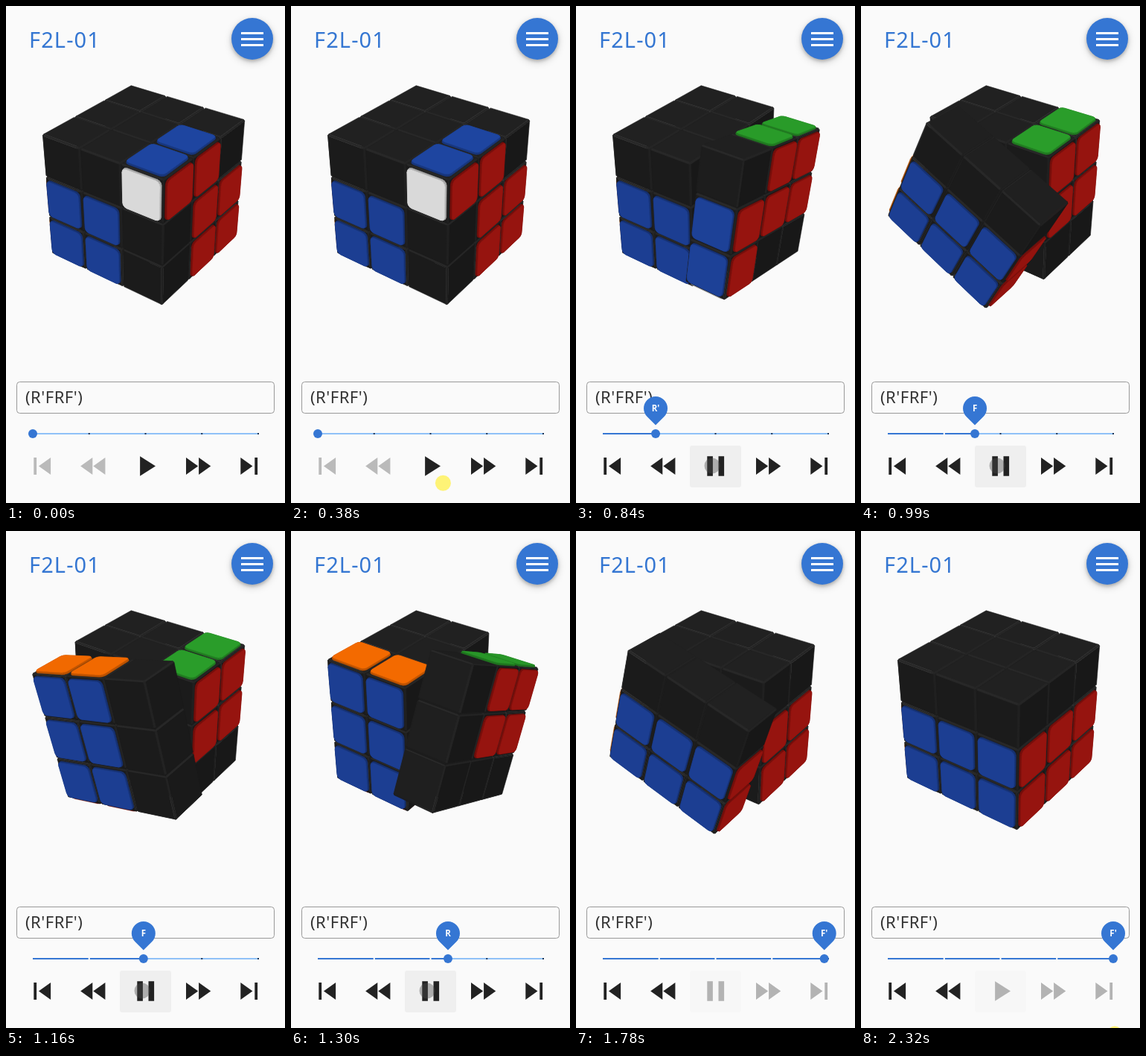
These frames come from a looping animation (375 px wide and 667 px high, 2400 ms). An HTML page with a canvas:

```html
<!DOCTYPE html>
<html lang="en">
<head>
<meta charset="utf-8">
<title>F2L-01</title>
<style>
html, body { margin: 0; width: 100%; height: 100%; overflow: hidden; background: #fafafa; }
canvas, svg { position: absolute; left: 0; top: 0; display: block; }
text { font-family: "Noto Sans", "Open Sans", sans-serif; }
#fab { filter: drop-shadow(0 2px 2px rgba(0,0,0,.2)) drop-shadow(0 3px 5px rgba(0,0,0,.2)); }
</style>
</head>
<body>
<canvas id="cube" width="375" height="667"></canvas>
<svg width="375" height="667" viewBox="0 0 375 667">
  <text x="31" y="56" font-size="29" letter-spacing="1.1" fill="#3476d2">F2L-01</text>
  <circle id="fab" cx="331" cy="44" r="28" fill="#3576d3"/>
  <path d="M316 35h30v3h-30zm0 8h30v3h-30zm0 8h30v3h-30z" fill="#fff"/>

  <rect x="14.5" y="504.5" width="346" height="42" rx="4" fill="none" stroke="#999"/>
  <text x="26" y="533" font-size="22" letter-spacing=".5" fill="#333">(R'FRF')</text>

  <rect x="36" y="573" width="304" height="2" fill="#8fc1f7"/>
  <rect id="track" x="36" y="573" height="2" fill="#3576d3"/>
  <g id="ticks"></g>
  <g id="thumb">
    <circle r="6" fill="#3576d3"/>
    <g id="pin">
      <path d="M-11.3-22.7A16 16 0 1 1 11.3-22.7L0-11.4z" fill="#3576d3"/>
      <text id="label" y="-30" font-size="11.5" font-weight="600" fill="#fff" text-anchor="middle"></text>
    </g>
  </g>

  <rect id="hover" x="153" y="590" width="69" height="56" rx="3"/>
  <circle id="ripple" cx="185" cy="617" r="28"/>
  <g id="buttons"></g>
  <circle id="cursor" r="10.5"/>
</svg>
<script>
const $ = id => document.getElementById(id);
const set = (el, attrs) => { for (const k in attrs) el.setAttribute(k, attrs[k]); };
const add = (parent, tag, attrs) => {
  const el = document.createElementNS("http://www.w3.org/2000/svg", tag);
  set(el, attrs);
  return parent.appendChild(el);
};
const clamp = v => Math.max(0, Math.min(1, v));

// ---- timing ----
const LOOP = 2400;
const STEPS = [0, 150, 230, 300, 380, 460, 530, 610, 680, 760, 840, 920, 990, 1070, 1160,
  1220, 1300, 1390, 1460, 1540, 1630, 1710, 1780, 1860, 1940, 2320];
const KEYS = [680, 990, 1300, 1540, 1780, 1860];
const TURNED = [.43, 1.29, 2.28, 2.978, 3.83, 4];
const SLID = [.29, 1.545, 2.31, 3, 3.93, 4];

function track(values, t) {
  if (t < KEYS[0]) return 0;
  const i = KEYS.findIndex(k => k > t);
  if (i < 0) return values[values.length - 1];
  const f = (t - KEYS[i - 1]) / (KEYS[i] - KEYS[i - 1]);
  return values[i - 1] + f * (values[i] - values[i - 1]);
}

// ---- vectors and camera ----
const dot = (a, b) => a[0] * b[0] + a[1] * b[1] + a[2] * b[2];
const cross = (a, b) => [a[1] * b[2] - a[2] * b[1], a[2] * b[0] - a[0] * b[2], a[0] * b[1] - a[1] * b[0]];
const unit = a => a.map(x => x / Math.hypot(...a));
const [sa, ca, se, ce] = [35.9, 32].flatMap(d => [Math.sin(d * Math.PI / 180), Math.cos(d * Math.PI / 180)]);
const RIGHT = [ca, 0, -sa], UP = [-se * sa, ce, -se * ca], TOWARD = [ce * sa, se, ce * ca];
const DIST = 10.5, FOCAL = 981, CX = 187.5, CY = 244.9;
const EYE = TOWARD.map(x => x * DIST);
const LIGHT = [.1, .9, .4];

function project(p) {
  const s = FOCAL / (DIST - dot(p, TOWARD));
  return [CX + s * dot(p, RIGHT), CY - s * dot(p, UP)];
}
const shade = n => .8 + .17 * Math.max(0, dot(n, LIGHT));
const faces = (p, n) => dot(n, EYE.map((e, i) => e - p[i])) > 0;

function rotate(v, axis, angle) {
  const i = (axis + 1) % 3, j = (axis + 2) % 3, c = Math.cos(angle), s = Math.sin(angle);
  const out = [...v];
  out[i] = v[i] * c - v[j] * s;
  out[j] = v[i] * s + v[j] * c;
  return out;
}

// ---- cubie geometry: a chamfered box with rounded plates ----
const HALF = .329, INNER = .309, PLATE = .296, ROUND = .065, RAISE = .026;
const grid = [];
for (const x of [-1, 0, 1]) for (const y of [-1, 0, 1]) for (const z of [-1, 0, 1])
  if (x || y || z) grid.push([x, y, z]);
const verts = grid.filter(g => g.every(Boolean))
  .flatMap(g => [0, 1, 2].map(a => g.map((s, i) => s * (i === a ? HALF : INNER))));
const sides = grid.map(n => {
  const top = Math.max(...verts.map(v => dot(v, n)));
  const t = unit(cross(n, [.3, .7, .2])), b = cross(unit(n), t);
  const turn = v => Math.atan2(dot(v, b), dot(v, t));
  return {
    n: unit(n),
    edge: Math.abs(n[0]) + Math.abs(n[1]) + Math.abs(n[2]) > 1,
    pts: verts.filter(v => dot(v, n) > top - 1e-6).sort((p, q) => turn(p) - turn(q))
  };
});
const outline = Array.from({ length: 16 }, (_, k) => {
  const q = (k >> 2) * Math.PI / 2, a = q + (k & 3) * Math.PI / 6;
  const c = PLATE - ROUND;
  return [Math.cos(a) * ROUND + Math.sign(Math.cos(q + .7)) * c,
          Math.sin(a) * ROUND + Math.sign(Math.sin(q + .7)) * c];
});
const plate = (axis, side, height, scale) => outline.map(([x, y]) => {
  const v = [];
  v[axis] = side * height;
  v[(axis + 1) % 3] = x * scale;
  v[(axis + 2) % 3] = y * scale;
  return v;
});

const RED = [184, 24, 18], ORANGE = [255, 111, 0], BLUE = [32, 72, 168],
      GREEN = [44, 165, 44], WHITE = [250, 250, 250];
const COLORS = [[ORANGE, RED], [WHITE, null], [GREEN, BLUE]];

// ---- turns: [axis, direction] ----
const R = [0, -1], Ri = [0, 1], F = [2, -1], Fi = [2, 1];
const SETUP = [F, Ri, Fi, R], MOVES = [Ri, F, R, Fi], NAMES = ["R'", "F", "R", "F'"];

function pose(home, progress) {
  const c = { home, pos: home, basis: [[1, 0, 0], [0, 1, 0], [0, 0, 1]], turning: false };
  const turns = [...SETUP.map(m => [m, 1]), ...MOVES.map((m, i) => [m, clamp(progress - i)])];
  for (const [[axis, dir], part] of turns) {
    if (!part || Math.round(c.pos[axis]) !== 1) continue;
    const angle = dir * part * Math.PI / 2;
    c.pos = rotate(c.pos, axis, angle);
    c.basis = c.basis.map(b => rotate(b, axis, angle));
    c.turning = part < 1;
    if (c.turning) break;
  }
  c.center = c.pos.map(x => x * 2 / 3);
  c.far = Math.hypot(...c.center.map((x, i) => x - EYE[i]));
  return c;
}

const ctx = $("cube").getContext("2d");
ctx.lineJoin = "round";
ctx.lineWidth = .6;

function fill(points, rgb) {
  ctx.fillStyle = ctx.strokeStyle = `rgb(${rgb.map(Math.round)})`;
  ctx.beginPath();
  points.forEach(p => ctx.lineTo(...p));
  ctx.closePath();
  ctx.fill();
  ctx.stroke();
}

function drawCubie(c) {
  const turn = v => [0, 1, 2].map(i => v[0] * c.basis[0][i] + v[1] * c.basis[1][i] + v[2] * c.basis[2][i]);
  const place = v => turn(v).map((x, i) => x + c.center[i]);
  const flat = pts => pts.map(v => project(place(v)));

  const stickers = [];
  c.home.forEach((side, axis) => {
    const color = side && c.home[1] < 1 && COLORS[axis][side > 0 ? 1 : 0];
    if (!color) return;
    const v = [0, 0, 0];
    v[axis] = side;
    const n = turn(v), mid = place(v.map(x => x * (HALF + RAISE)));
    stickers.push({ axis, side, color, n, front: faces(mid, n) });
  });

  const drawSticker = s => {
    const low = flat(plate(s.axis, s.side, HALF, 1));
    const high = flat(plate(s.axis, s.side, HALF + RAISE, .98));
    const light = shade(s.n), rim = s.color.map(x => x * light * .78);
    low.forEach((p, i) => {
      const j = (i + 1) % low.length;
      fill([p, low[j], high[j], high[i]], rim);
    });
    if (s.front) fill(high, s.color.map(x => x * light));
  };

  stickers.filter(s => !s.front).forEach(drawSticker);
  for (const s of sides) {
    const n = turn(s.n);
    if (!faces(place(s.pts[0]), n)) continue;
    const g = 36 * shade(n) ** 2 * (s.edge ? 1.22 : 1);
    fill(flat(s.pts), [g, g, g]);
  }
  stickers.filter(s => s.front).forEach(drawSticker);
}

function drawCube(progress) {
  ctx.clearRect(0, 0, 375, 667);
  grid.map(g => pose(g, progress))
    .sort((a, b) => a.turning - b.turning || b.far - a.far)
    .forEach(drawCubie);
}

// ---- controls ----
const PLAY = "M8 5v14l11-7z", PAUSE = "M6 19h4V5H6zM14 5v14h4V5z";
const ICONS = ["M6 6h2v12H6zm3.5 6l8.5 6V6z", "M11 18V6l-8.5 6zm.5-6l8.5 6V6z", PLAY,
  "M4 18l8.5-6L4 6zm9-12v12l8.5-6z", "M6 18l8.5-6L6 6zM16 6v12h2V6z"];
const buttons = ICONS.map((d, i) =>
  add($("buttons"), "path", { d, transform: `translate(${25.9 + 69.5 * i} 594.7) scale(1.9)` }));
const GAP = 75.75;
const ticks = [1, 2, 3, 4].map(i =>
  add($("ticks"), "rect", { x: 35 + GAP * i, y: 573, width: 2, height: 2 }));

function drawControls(t) {
  const p = track(SLID, t), x = 36 + GAP * p;
  set($("track"), { width: x - 36 });
  set($("thumb"), { transform: `translate(${x} 574)` });
  ticks.forEach((el, i) => set(el, { fill: p > i + 1 ? "#fff" : "#1d3557" }));

  const grow = t < 680 ? 0 : Math.min(1, .44 + (t - 680) / 180);
  set($("pin"), { transform: `scale(${grow})`, opacity: grow });
  $("label").textContent = NAMES[Math.max(0, Math.ceil(p) - 1)];

  const done = t >= 1780;
  const back = t < 680 ? "#bababa" : t < 760 ? "#8c8c8c" : "#222";
  const next = done ? "#b3b3b3" : "#222";
  buttons.forEach((el, i) => set(el, { fill: i < 2 ? back : next }));
  set(buttons[2], { d: t >= 680 && t < 1860 ? PAUSE : PLAY });

  set($("hover"), { opacity: t < 680 ? 0 : t < 760 ? .015 : done ? .012 : .045 });
  set($("ripple"), { opacity: t < 680 ? 0 : Math.max(0, .24 - (t - 680) / 600) });
  drawCursor(t);
}

function drawCursor(t) {
  const away = t < 680 ? 1 - clamp((t - 150) / 430) : clamp((t - 1560) / 180);
  const shown = (t >= 150 && t < 1780) || t >= 2320;
  const held = t >= 680 && t < 1600;
  const [cx, cy] = t >= 2320 ? [341, 675] : [183 + 46 * away, 617 + 50 * away];
  set($("cursor"), { cx, cy, opacity: shown ? (held ? .4 : .75) : 0, fill: held ? "#4a4a4a" : "#fff04a" });
}

let last = -1;
function frame(now) {
  const time = now % LOOP;
  const t = STEPS.filter(s => s <= time).pop();
  if (t !== last) {
    drawCube(track(TURNED, t));
    drawControls(t);
    last = t;
  }
  requestAnimationFrame(frame);
}
frame(0);
</script>
</body>
</html>
```
